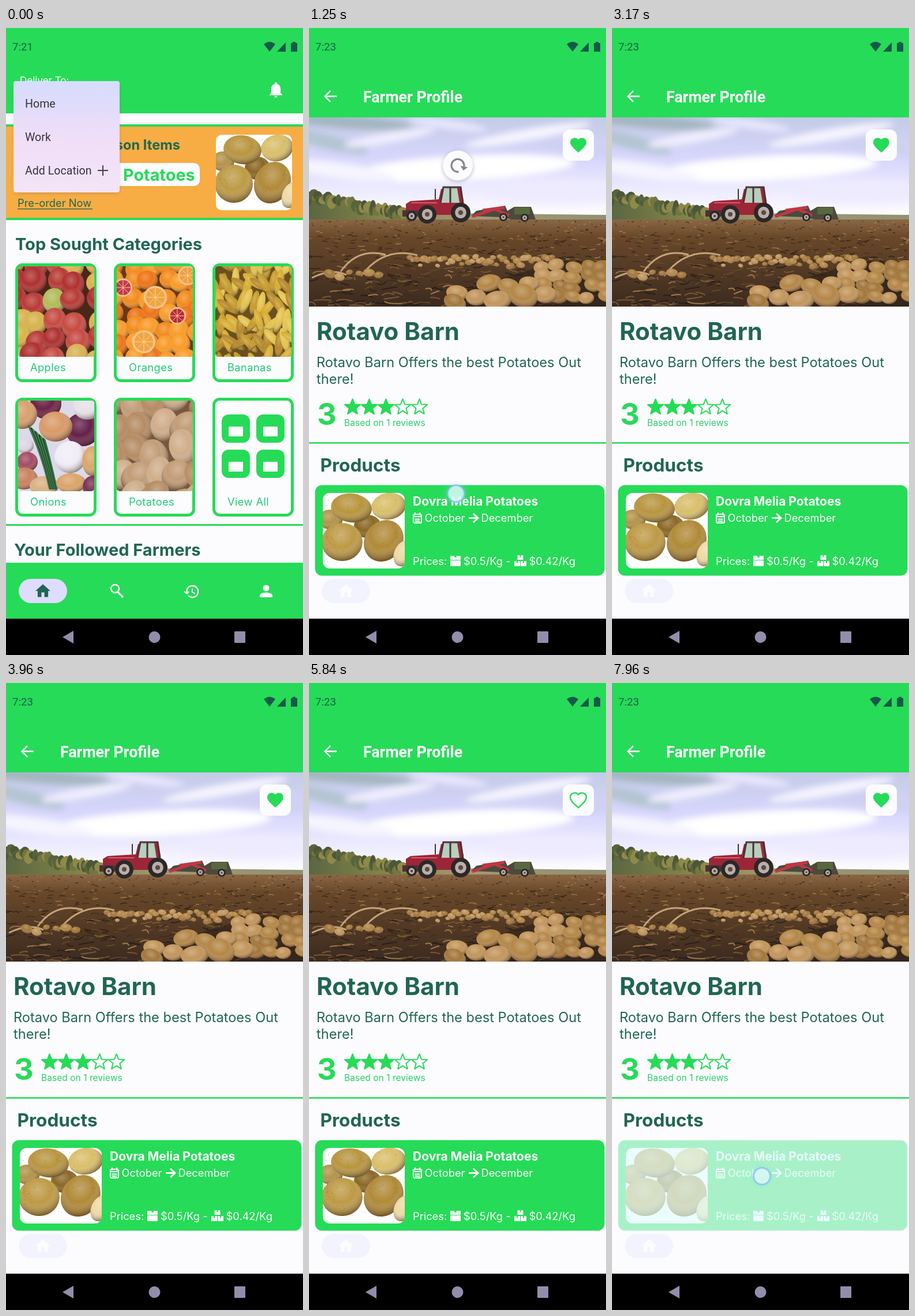
An HTML page that plays this animation: 515x1087 px, repeating every 8000 ms.

```html
<!DOCTYPE html>
<html lang="en">
<head>
<meta charset="utf-8">
<title>Farm market app</title>
<style>
html, body { margin: 0; width: 100%; height: 100%; overflow: hidden; background: #fcfcff; }
svg { display: block; width: 100vw; height: 100vh; }
text { font-family: Inter, sans-serif; white-space: pre; }
.roboto { font-family: Roboto, sans-serif; }
</style>
</head>
<body>
<svg id="stage" viewBox="0 0 515 1087"></svg>
<script>
const GREEN = '#26db57', TEAL = '#206652', PAPER = '#fcfcff', GREY = '#918eab';
const LOOP = 8000;
const HEART = 'M12 21.35l-1.45-1.32C5.4 15.36 2 12.28 2 8.5 2 5.42 4.42 3 7.5 3c1.74 0 3.41.81 4.5 2.09C13.09 3.81 14.76 3 16.5 3 19.58 3 22 5.42 22 8.5c0 3.78-3.4 6.86-8.55 11.54z';
const HOUSE = 'M10 20v-6h4v6h5v-8h3L12 3 2 12h3v8z';

// Markup helpers
const attrs = o => Object.entries(o).map(([k, v]) => ` ${k}="${v}"`).join('');
const rect = (x, y, width, height, fill, rx = 0, more = {}) =>
  `<rect${attrs({ x, y, width, height, fill, rx, ...more })}/>`;
const oval = (cx, cy, rx, ry, fill, more = {}) =>
  `<ellipse${attrs({ cx, cy, rx, ry, fill, ...more })}/>`;
const path = (d, fill, more = {}) => `<path${attrs({ d, fill, ...more })}/>`;
const line = (d, stroke, width, more = {}) =>
  path(d, 'none', { stroke, 'stroke-width': width, ...more });
const text = (x, y, size, fill, str, weight = 400, more = {}) =>
  `<text${attrs({ x, y, fill, 'font-size': size, 'font-weight': weight, ...more })}>${str}</text>`;
const group = (body, more = {}) => `<g${attrs(more)}>${body}</g>`;
const icon = (x, y, scale, d, fill, more = {}) =>
  path(d, fill, { transform: `translate(${x} ${y}) scale(${scale}) translate(-12 -12)`, ...more });
const repeat = (n, draw) => Array.from({ length: n }, (_, i) => draw(i)).join('');

function random(seed) {
  return (lo = 0, hi = 1) => {
    seed = (seed * 16807) % 2147483647;
    return lo + (hi - lo) * seed / 2147483647;
  };
}

let clips = 0;
function photo(x, y, w, h, rx, body) {
  const id = 'clip' + clips++;
  return `<clipPath id="${id}">${rect(0, 0, w, h, '#000', rx)}</clipPath>` +
    group(body, { 'clip-path': `url(#${id})`, transform: `translate(${x} ${y})` });
}
const lump = (x, y, rx, ry, fill, angle = 0) => {
  const turn = { transform: `rotate(${angle} ${x} ${y})` };
  return oval(x, y, rx, ry, fill, turn) + oval(x, y, rx, ry, 'url(#shade)', turn);
};

// Jittered rows of shaded ovals filling a tile picture
function heap(seed, back, colors, rx, ry, spread = 0) {
  const r = random(seed), cols = Math.ceil(132 / rx / 1.6), rows = Math.ceil(157 / ry / 1.5);
  return rect(0, 0, 132, 157, back) + repeat((cols + 1) * (rows + 1), i => {
    const x = (i % (cols + 1)) * rx * 1.6 + r(-.4, .4) * rx;
    const y = Math.floor(i / (cols + 1)) * ry * 1.5 + r(-.4, .4) * ry;
    return lump(x, y, rx * r(.9, 1.1), ry * r(.9, 1.1),
      colors[Math.floor(r(0, colors.length))], r(-spread, spread));
  });
}

function potatoes(w) {
  const r = random(77);
  const body = rect(0, 0, 132, 131, '#fff') +
    lump(12, 46, 20, 17, '#b3934b') + lump(106, 23, 28, 23, '#d9bf6b', -12) +
    lump(72, 58, 22, 20, '#8a6726') + lump(46, 26, 33, 25, '#b8953f', 8) +
    lump(31, 85, 33, 33, '#bd9a45', 20) + lump(98, 83, 31, 37, '#b08a38', 24) +
    lump(130, 105, 15, 23, '#eedba5', 20) +
    repeat(90, () => oval(r(5, 122), r(8, 112), .7, .7, '#765b25', { opacity: .45 }));
  return group(body, { transform: `scale(${w / 132} 1)` });
}

function onions() {
  return rect(0, 0, 132, 157, '#dcd9ea') +
    lump(48, 5, 27, 27, '#6d2146') + lump(112, 50, 30, 29, '#642049') +
    lump(120, 10, 25, 23, '#e7e2e8') + lump(8, 24, 25, 25, '#d7a06d') +
    lump(65, 45, 29, 26, '#d99a67') +
    lump(12, 78, 15, 13, '#ded6e6') + lump(16, 106, 18, 17, '#a44b62') +
    lump(10, 135, 24, 19, '#c98260') + lump(45, 148, 25, 17, '#d9b184') +
    repeat(13, i => line(`M${18 + i * 2.3} ${43 + i * 2}Q${42 + i} 95 ${55 + i} 154`,
      ['#2d6b41', '#58894e', '#173f2b'][i % 3], 3)) +
    lump(90, 98, 27, 28, '#f0edf6') + lump(129, 105, 18, 26, '#dba66b') +
    lump(92, 143, 26, 17, '#dca469') + lump(130, 150, 18, 20, '#7a3252');
}

function oranges() {
  const slice = (x, y, r, flesh) => oval(x, y, r, r, '#f4c48a') + oval(x, y, r * .82, r * .82, flesh) +
    repeat(8, i => line(`M${x} ${y}l${r * .8 * Math.cos(i * .785)} ${r * .8 * Math.sin(i * .785)}`, '#f8d7a0', 1));
  return heap(19, '#663a16', ['#f28a1c', '#ee7415', '#f99b27'], 18, 18) +
    slice(11, 37, 16, '#c8354d') + slice(67, 54, 20, '#efa53f') + slice(47, 131, 20, '#f0a545') +
    slice(105, 86, 15, '#bd283c') + slice(123, 16, 17, '#eea044');
}

function farmland() {
  const r = random(2024);
  const pick = list => list[Math.floor(r(0, list.length))];
  const straw = repeat(650, () => {
    const y = 179 + 149 * Math.pow(r(), 1.3), x = r(-10, 515), k = (y - 165) / 150;
    return line(`M${x} ${y}q${r(4, 16) * k} ${r(-9, 6) * k} ${r(10, 32) * k} ${r(-6, 6) * k}`,
      pick(['#2b1d15', '#8a6238', '#b98f5a', '#3d2a1c', '#6d4b2c', '#241a16']), 1 + k, { opacity: .8 });
  });
  const tuber = (x, y, s) =>
    lump(x, y, s, s * r(.66, .8), pick(['#b48646', '#a2763a', '#c2955a']), r(-15, 30));
  const wheel = (x, y, s) => oval(x, y, s, s, '#2b2828') + oval(x, y, s * .58, s * .6, '#b9b0a8') + oval(x, y, s * .25, s * .25, '#5c4a46');
  const tractor =
    path('M168 150l8-5 49-3 4-18 34-2 5 22 1 25h-92l-9-7z', '#9c2638') +
    path('M231 124l26-1 4 25h-32z', '#b8cfbd') + line('M228 148l5-27h30l4 28M245 122v26', '#473434', 3) +
    rect(162, 161, 27, 11, '#4d3038') + line('M219 142v-18', '#403536', 2) + line('M177 148h45', '#d9596a', 2) +
    wheel(205, 168, 16) + wheel(263, 165, 17) + wheel(178, 171, 9) +
    path('M281 171l9-9 50-9 4 9 12-7h29l8 22h-42l-14-4z', '#4b4a3c') +
    line('M283 172l39-13 25 11M301 161l38-5', '#c13643', 5) + rect(356, 156, 27, 12, '#58683d') +
    wheel(337, 173, 7) + wheel(374, 174, 7);
  const cloud = (x, y, rx, ry, fill, angle) => oval(x, y, rx, ry, fill, { transform: `rotate(${angle} ${x} ${y})` });
  const clouds = group(
    cloud(70, 8, 110, 11, '#a3b5bf', 4) + cloud(30, 42, 75, 12, '#b3c5d2', 14) +
    cloud(140, 35, 80, 9, '#f1efff', -10) + cloud(240, 12, 70, 8, '#e9e7ff', 8) +
    cloud(380, 30, 110, 10, '#f6f4ff', -10) + cloud(470, 52, 80, 12, '#cfd0f2', 8) +
    cloud(270, 88, 190, 22, '#fff', -3) + cloud(50, 92, 100, 14, '#f5f4ff', 8) +
    cloud(430, 128, 130, 20, '#eeebff', 0), { filter: 'url(#soft)' });
  const trees = repeat(60, i => {
    const x = i * 3, top = 132 + x * .19;
    return oval(x, top + r(0, 10), r(4, 9), r(5, 12), pick(['#59633c', '#727640', '#8f8a4a', '#4c5738']));
  });
  return rect(0, 0, 515, 328, 'url(#sky)') + clouds +
    path('M0 134l175 31 340 4v12H0z', 'url(#trees)') + trees +
    rect(0, 177, 515, 151, 'url(#soil)') + straw +
    line('M55 267q30-42 78-29M90 275q40-52 98-36M5 278q35-17 60-5', '#c5a47b', 3) +
    tractor +
    repeat(42, i => tuber(175 + i * 6, 250 + r(-9, 8), r(4, 8))) +
    repeat(6, i => tuber(36 + i * 17, 265 + r(-5, 12), r(5, 11))) +
    path('M390 262l40-14 85 3v77H240l10-22 60-20z', '#33241a', { opacity: .75 }) +
    repeat(20, i => tuber(408 + (i % 5) * 26 + r(-6, 6), 257 + Math.floor(i / 5) * 18 + r(-5, 5), r(13, 18))) +
    tuber(312, 287, 22) + tuber(347, 294, 20) + tuber(382, 288, 18) + tuber(410, 307, 20) +
    tuber(257, 304, 19) + tuber(290, 312, 18) + tuber(327, 317, 24) + tuber(371, 309, 26) + tuber(253, 321, 20);
}

const statusBar = clock => text(11, 39, 18.6, '#1a604f', clock, 400, { class: 'roboto' }) +
  path('M447 28q10-8 20 0l-10 13zM470 41l15-16v16z', '#14594c') +
  path('M494 26h3v-2h5v2h3v15h-11z', '#14594c');
const systemBar = rect(0, 1024, 515, 63, '#000') + path('M98 1056l19-11v22z', GREY) +
  oval(257.5, 1056, 10, 10, GREY) + rect(396, 1046, 19, 20, GREY, 1);

function tile(col, row, label, picture) {
  const x = 16 + col * 171, y = 408 + row * 233;
  return rect(x + 2.5, y + 2.5, 136, 201, PAPER, 10, { stroke: GREEN, 'stroke-width': 5 }) +
    (picture ? photo(x + 5, y + 5, 132, 157, 5, picture) : '') +
    text(x + 26, y + 187, 18.3, '#20cc75', label, 400, { 'letter-spacing': .4 });
}

const home =
  rect(0, 0, 515, 1087, PAPER) + rect(0, 0, 515, 148, GREEN) + statusBar('7:21') +
  text(24, 97, 17, '#fff', 'Deliver To:') +
  icon(468, 107, 1.35, 'M12 22c1.1 0 2-.9 2-2h-4c0 1.1.9 2 2 2zm6-6v-5c0-3.07-1.63-5.64-4.5-6.32V4a1.5 1.5 0 0 0-3 0v.68C7.64 5.36 6 7.92 6 11v5l-2 2v1h16v-1z', '#fff') +
  rect(0, 167, 515, 166, GREEN) + rect(0, 171, 515, 158, '#f7ad43') +
  text(302, 211, 23.6, TEAL, 'Season Items', 700, { 'text-anchor': 'end' }) +
  rect(100, 234, 236, 40, PAPER, 10) + text(203, 265, 28.8, GREEN, 'Potatoes', 700) +
  text(20, 310, 18.3, TEAL, 'Pre-order Now') + rect(20, 313, 130, 1.3, TEAL) +
  photo(364, 185, 132, 131, 10, potatoes(132)) +
  text(16, 385, 29, TEAL, 'Top Sought Categories', 700) +
  tile(0, 0, 'Apples', heap(8, '#492719', ['#b83a35', '#d7b34c', '#c64a42', '#b2bb59', '#d9b155', '#ae302f'], 21, 21)) +
  tile(1, 0, 'Oranges', oranges()) +
  tile(2, 0, 'Bananas', heap(31, '#6b501d', ['#d8ad31', '#c79a29', '#e4c34e', '#b68827'], 7, 22, 60)) +
  tile(0, 1, 'Onions', onions()) +
  tile(1, 1, 'Potatoes', heap(47, '#77573d', ['#c29c77', '#b58b63', '#cfad8a'], 23, 29, 55)) +
  tile(2, 1, 'View All') +
  repeat(4, i => {
    const x = 374 + (i % 2) * 60, y = 670 + (i >> 1) * 61;
    return rect(x, y, 49, 49, GREEN, 12) + rect(x + 12, y + 21, 25, 17, PAPER, 1);
  }) +
  rect(0, 860, 515, 3, GREEN) + text(14, 915, 29, TEAL, 'Your Followed Farmers', 700) +
  rect(0, 927, 515, 97, GREEN) + rect(22, 955, 84, 42, '#dedcff', 21) +
  icon(64, 976, 1.3, HOUSE, TEAL) +
  oval(189, 972, 7, 7, 'none', { stroke: '#fff', 'stroke-width': 2.6 }) + line('M194 978l9 9', '#fff', 3.2) +
  icon(322, 977, 1.25, 'M13 3a9 9 0 0 0-9 9H1l4 4 4-4H6a7 7 0 1 1 2.06 4.94l-1.42 1.42A9 9 0 1 0 13 3zm-1 5v5l4.28 2.54.72-1.21-3.5-2.08V8z', '#fff') +
  oval(451, 971, 5.5, 5.5, '#fff') + path('M440 987v-3c0-7 22-7 22 0v3z', '#fff') +
  rect(14, 96, 183, 191, '#555', 5, { opacity: .22, filter: 'url(#soft2)' }) +
  rect(13, 92, 184, 193, 'url(#menu)', 4) +
  ['Home', 'Work', 'Add Location'].map((s, i) =>
    text(33, 138 + i * 58, 19.6, '#383341', s, 400, { class: 'roboto' })).join('') +
  line('M159 247h18M168 238v18', '#45404d', 2) + systemBar;

const star = (x, full) => path(
  'M' + Array.from({ length: 10 }, (_, i) => {
    const a = (i / 5 - .5) * Math.PI, s = i % 2 ? 6.2 : 14.3;
    return `${x + s * Math.cos(a)} ${657.5 + s * Math.sin(a)}`;
  }).join('L') + 'z', full ? GREEN : 'none', { stroke: GREEN, 'stroke-width': 2, 'stroke-linejoin': 'round' });

const carton = (x, y, w, h) => rect(x, y, w, h, '#fff', 1) + rect(x + w * .4, y, w * .2, h * .4, GREEN);
const card =
  rect(10.5, 792.5, 502, 157, GREEN, 12) + photo(24, 806, 142, 131, 12, potatoes(142)) +
  text(180, 828, 21, '#fff', 'Dovra Melia Potatoes', 700) +
  rect(181, 843, 14, 15, 'none', 2, { stroke: '#fff', 'stroke-width': 2 }) +
  line('M180 847h16M184 840v5M192 840v5M183.5 851.5h9M183.5 855h9', '#fff', 2) +
  text(200.5, 856, 18.3, '#fff', 'October') +
  line('M277 849.5h15M285 842l8 7.5-8 7.5', '#fff', 3) +
  text(298.5, 856, 18.3, '#fff', 'December') + text(180, 931, 18.3, '#fff', 'Prices:') +
  carton(245, 915, 18, 7) + rect(245, 923, 18, 10, '#fff', 1) +
  text(268, 931, 18.3, '#fff', '$0.5/Kg -') +
  carton(361.5, 914, 10, 8) + carton(356, 924, 10, 9) + carton(367, 924, 10, 9) +
  text(381.5, 931, 18.3, '#fff', '$0.42/Kg');

const profile =
  rect(0, 0, 515, 1087, PAPER) + photo(0, 155, 515, 328, 0, farmland()) +
  rect(440, 176, 54, 54, PAPER, 12) + icon(467, 203, 1.4, HEART, GREEN, { id: 'heart' }) +
  group(
    oval(0, 2, 27, 27, '#556', { opacity: .3, filter: 'url(#soft2)' }) + oval(0, 0, 26, 26, PAPER) +
    `<circle id="arc" r="11" pathLength="360" fill="none" stroke="#000" stroke-width="3.2"/>` +
    path('M4.5 0h13l-6.5 7z', '#000', { id: 'arrow' }),
    { id: 'spinner' }) +
  rect(0, 0, 515, 155, GREEN) + statusBar('7:23') +
  line('M48 118.5H28M37 109l-9.5 9.5 9.5 9.5', '#fff', 2.5) +
  text(94, 129, 26.8, '#fff', 'Farmer Profile', 700, { class: 'roboto' }) +
  text(13, 541, 42, TEAL, 'Rotavo Barn', 700) +
  text(13, 588, 23.6, TEAL, 'Rotavo Barn Offers the best Potatoes Out') + text(13, 617, 23.6, TEAL, 'there!') +
  text(14, 688, 52.4, GREEN, '3', 700) + repeat(5, i => star(75.5 + i * 29, i < 3)) +
  text(61, 690, 15.6, '#2bd06a', 'Based on 1 reviews') +
  rect(0, 718, 515, 2.6, GREEN) + text(19.5, 769, 31.6, TEAL, 'Products', 700) +
  rect(11.5, 793.5, 500, 155, '#e1fcfa', 12) + group(card, { id: 'card' }) +
  rect(22, 955, 84, 42, '#f3f2ff', 21) + icon(64, 976, 1.3, HOUSE, PAPER) + systemBar;

const gradient = (id, stops, tag = 'linearGradient', more = { x1: 0, y1: 0, x2: 0, y2: 1 }) =>
  `<${tag}${attrs({ id, ...more })}>` + stops.map(([offset, color, alpha = 1]) =>
    `<stop${attrs({ offset, 'stop-color': color, 'stop-opacity': alpha })}/>`).join('') + `</${tag}>`;
const blur = (id, s) => `<filter id="${id}" x="-50%" y="-50%" width="200%" height="200%"><feGaussianBlur stdDeviation="${s}"/></filter>`;

const stage = document.getElementById('stage');
stage.innerHTML = '<defs>' +
  gradient('sky', [[0, '#c3cbe6'], [.22, '#d8d6fd'], [.5, '#fbfaff']]) +
  gradient('soil', [[0, '#8b6745'], [.2, '#694829'], [1, '#3b2a20']]) +
  gradient('trees', [[0, '#5b6741'], [.3, '#8a8a4c'], [.55, '#a49875'], [1, '#8f916f']], 'linearGradient', {}) +
  gradient('menu', [[0, '#d6ddff'], [.25, '#e2dcfb'], [.5, '#f0def8'], [1, '#f3e4f7']]) +
  gradient('shade', [[0, '#fff', .25], [.5, '#fff', 0], [1, '#30180a', .5]], 'radialGradient', { cx: .4, cy: .34, r: .68 }) +
  blur('soft', 6) + blur('soft2', 3) + '</defs>' +
  group(home, { id: 'home' }) + group(profile, { id: 'profile' }) +
  group(oval(0, 0, 18, 18, '#6fe6ee', { opacity: .3, filter: 'url(#soft2)' }) +
    oval(0, 0, 14.5, 14.5, '#dffaf8', { 'fill-opacity': .8, stroke: '#91b3ed', 'stroke-opacity': .7, 'stroke-width': 3 }), { id: 'touch' });

const el = Object.fromEntries([...stage.querySelectorAll('g[id], #heart, #arc, #arrow')].map(n => [n.id, n]));
const set = (node, o) => { for (const k in o) node.setAttribute(k, o[k]); };
const show = (node, on) => { node.style.display = on ? '' : 'none'; };
const clamp = v => Math.max(0, Math.min(1, v));
const ramp = (t, a, b) => clamp((t - a) / (b - a));
const smooth = v => v * v * (3 - 2 * v);
const mix = (a, b, k) => a + (b - a) * k;

const CUT = 860;
const DRAG = { from: 930, to: 1330, speed: .77, slop: 24 };
const REST = 213, TRAVEL = 84;
const SETTLE = 200, GROW = 400, SHRINK = 150, LOAD = 850, CYCLE = 1332;
const TAPS = [{ at: 4580, angle: 8 }, { at: 6290, angle: 36 }];
const LOADS = [{ at: DRAG.to, angle: 0, pulled: true }, ...TAPS];

// Pull-to-refresh: travel follows the finger at half speed, then stiffens
function pullState(t) {
  const pull = Math.max(0, (t - DRAG.from) * DRAG.speed - DRAG.slop) / 2 / TRAVEL;
  const over = Math.min(2, Math.max(0, pull - 1)) / 4;
  const tension = (over - over * over) * 2;
  const reach = Math.min(1, pull), grown = Math.max(0, reach - .4) / .6;
  const full = DRAG.from + (2 * TRAVEL + DRAG.slop) / DRAG.speed;
  return {
    y: REST + TRAVEL * (reach - 1 + 2 * tension),
    turn: 180 * (.4 * grown - .25 + 2 * tension),
    sweep: 288 * grown,
    alpha: mix(.3, 1, ramp(t, full, full + 300)),
  };
}

function drawSpinner(t) {
  const load = LOADS.find(l => t >= l.at && t < l.at + LOAD + SHRINK);
  const dragging = t >= DRAG.from && t < DRAG.to;
  show(el.spinner, load || dragging);
  if (!load && !dragging) return;

  const pulled = dragging || load.pulled;
  const pull = pullState(Math.min(t, DRAG.to));
  const spin = load ? load.at + (pulled ? SETTLE : GROW) : Infinity;
  const spinning = t >= spin;
  let { turn, sweep } = pull;
  if (spinning) {
    // A pulled arc is already full, so it starts halfway through its cycle
    const p = ((t - spin) / CYCLE + (pulled ? .5 : 0)) % 1;
    const head = 288 * smooth(clamp(p * 2)), tail = 288 * smooth(clamp(p * 2 - 1));
    turn = (pulled ? pull.turn - 145 : load.angle) + 291 * p + tail;
    sweep = Math.max(16, head - tail);
  }
  const y = pulled ? mix(pull.y, REST, smooth(ramp(t, DRAG.to, DRAG.to + SETTLE))) : REST;
  const grow = pulled ? 1 : smooth(ramp(t, load.at, spin));
  const shrink = load ? 1 - ramp(t, load.at + LOAD, load.at + LOAD + SHRINK) : 1;
  set(el.spinner, { transform: `translate(258 ${y}) scale(${grow * shrink})` });
  set(el.arc, {
    'stroke-dasharray': `${sweep} 360`,
    transform: `rotate(${turn})`,
    opacity: pulled && !spinning ? pull.alpha : 1,
  });
  set(el.arrow, { transform: `rotate(${turn + sweep})`, opacity: pull.alpha });
  show(el.arc, pulled || spinning);
  show(el.arrow, pulled && !spinning);
}

function drawHeart(t) {
  const done = TAPS.map(tap => tap.at + LOAD);
  const loading = TAPS.some(tap => t >= tap.at && t < tap.at + LOAD);
  const liked = t < done[0] || t >= done[1];
  const color = loading ? GREY : GREEN;
  set(el.heart, { fill: liked ? color : 'none', stroke: liked ? 'none' : color, 'stroke-width': 1.8 });
}

function drawTouch(t) {
  const drag = t - DRAG.from;
  const spot = drag >= 0 && t < DRAG.to ? [270 - drag * .047, 560 + drag * DRAG.speed]
    : TAPS.some(tap => t >= tap.at - 110 && t < tap.at) ? [467, 203]
    : t >= 7840 ? [260, 855] : null;
  show(el.touch, spot);
  if (spot) set(el.touch, { transform: `translate(${spot})` });
}

function draw(t) {
  show(el.home, t < CUT);
  show(el.profile, t >= CUT);
  drawSpinner(t);
  drawHeart(t);
  drawTouch(t);
  set(el.card, { opacity: mix(1, .3, smooth(ramp(t, 7840, 7950))) });
}

const start = performance.now();
function tick() {
  draw((performance.now() - start) % LOOP);
  requestAnimationFrame(tick);
}
tick();
</script>
</body>
</html>
```
